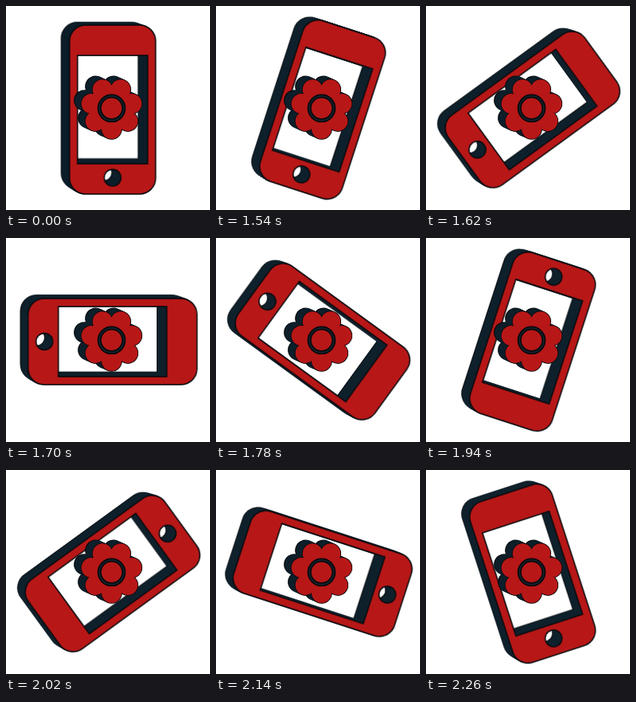
Recreate the animation shown at these times as an HTML page without scripts. Size 256 by 256 pixels, loop 2.3 s.

```html
<!DOCTYPE html>
<html lang="en">
<head>
<meta charset="utf-8">
<title>Spinning phone</title>
<style>
html, body { margin: 0; width: 100%; height: 100%; overflow: hidden; background: #fff; }
svg { display: block; width: 100vw; height: 100vh; }
.spin { animation: spin 2300ms linear infinite; }
.side { fill: #0e202b; stroke: #0e202b; stroke-width: 1.2; }
.rim { fill: #0e202b; stroke: #04090d; stroke-width: 1.5; }
.face { fill: #b71717; stroke: #04090d; stroke-width: 1.5; }

/* rest, then nineteen quick steps of 18 degrees */
@keyframes spin {
  0%, 66.956% { transform: rotate(0deg); }
  66.9565% { transform: rotate(18deg); animation-timing-function: steps(19, jump-end); }
  100% { transform: rotate(360deg); }
}
</style>
</head>
<body>
<svg viewBox="0 0 256 256">
  <defs>
    <path id="phone" fill-rule="evenodd" d="
      M-34 -106H34A20 20 0 0 1 54 -86V86A20 20 0 0 1 34 106H-34A20 20 0 0 1 -54 86V-86A20 20 0 0 1 -34 -106Z
      M-44 -68V68H44V-68Z
      M-10.5 85.5a10.5 10.5 0 1 0 21 0a10.5 10.5 0 1 0 -21 0Z"/>
    <circle id="petal" cy="26" r="12.5"/>
    <g id="flower">
      <use href="#petal"/>
      <use href="#petal" transform="rotate(51.43)"/>
      <use href="#petal" transform="rotate(102.86)"/>
      <use href="#petal" transform="rotate(154.29)"/>
      <use href="#petal" transform="rotate(205.71)"/>
      <use href="#petal" transform="rotate(257.14)"/>
      <use href="#petal" transform="rotate(308.57)"/>
      <circle r="24"/>
    </g>
    <g id="pair">
      <use href="#flower" x="-1.1" y="-.5"/>
      <use href="#flower"/>
    </g>
    <g id="quad">
      <use href="#pair" x="-2.2" y="-1"/>
      <use href="#pair"/>
    </g>
  </defs>

  <!-- phone, back to front -->
  <g transform="translate(133.7 130)">
    <g transform="translate(-11 -5) scale(.985)"><use href="#phone" class="rim spin"/></g>
    <g class="side">
      <g transform="translate(-9.9 -4.5) scale(.9865)"><use href="#phone" class="spin"/></g>
      <g transform="translate(-8.8 -4) scale(.988)"><use href="#phone" class="spin"/></g>
      <g transform="translate(-7.7 -3.5) scale(.9895)"><use href="#phone" class="spin"/></g>
      <g transform="translate(-6.6 -3) scale(.991)"><use href="#phone" class="spin"/></g>
      <g transform="translate(-5.5 -2.5) scale(.9925)"><use href="#phone" class="spin"/></g>
      <g transform="translate(-4.4 -2) scale(.994)"><use href="#phone" class="spin"/></g>
      <g transform="translate(-3.3 -1.5) scale(.9955)"><use href="#phone" class="spin"/></g>
      <g transform="translate(-2.2 -1) scale(.997)"><use href="#phone" class="spin"/></g>
      <g transform="translate(-1.1 -.5) scale(.9985)"><use href="#phone" class="spin"/></g>
    </g>
    <use href="#phone" class="face spin"/>
  </g>

  <!-- flower -->
  <g transform="translate(132.5 128.3)">
    <use href="#flower" class="rim" x="-8.8" y="-4"/>
    <g class="side">
      <use href="#quad" x="-4.4" y="-2"/>
      <use href="#quad"/>
    </g>
    <use href="#flower" class="rim"/>
    <use href="#flower" fill="#b71717"/>
    <circle r="15.3" fill="none" stroke="#04090d" stroke-width="5"/>
    <circle r="15.3" fill="none" stroke="#14242d" stroke-width="1.6"/>
  </g>
</svg>
</body>
</html>
```
